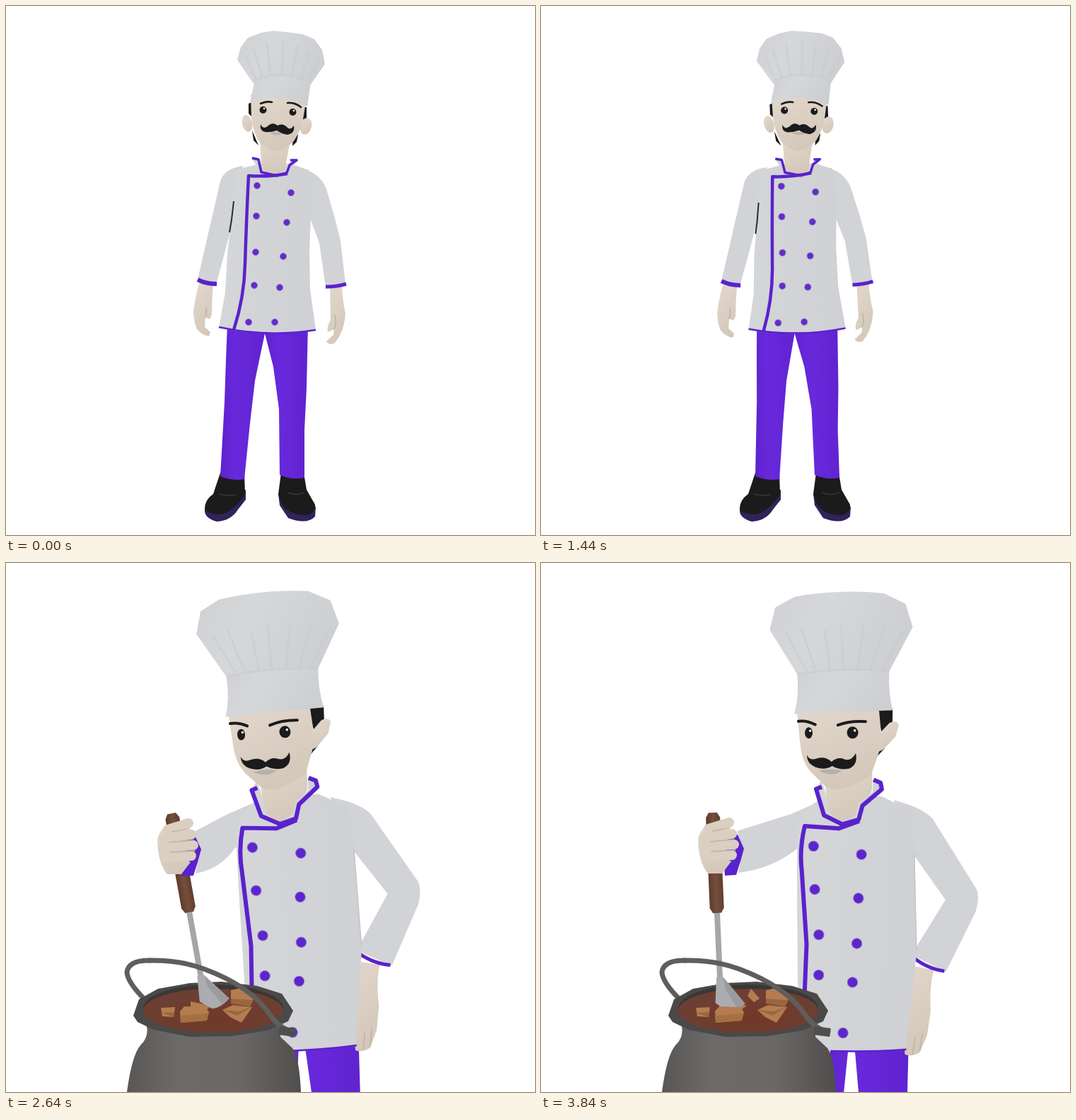
Animation, 748 px wide and 748 px high, one loop 3920 ms. Source, as an HTML page:

```html
<!DOCTYPE html>
<html lang="en">
<head>
<meta charset="utf-8">
<title>Chef</title>
<style>
html, body { margin: 0; width: 100%; height: 100%; overflow: hidden; background: #fff; }
svg { display: block; width: 100%; height: 100%; }
.trim { fill: none; stroke: #5a22cc; stroke-linejoin: round; }
.hair { fill: #1b1b1c; }
.brow { fill: none; stroke: #1b1b1c; stroke-linecap: round; }
.fold { fill: none; stroke: #c8cacd; stroke-width: 3; opacity: .5; }
.crease { fill: none; stroke: #bfb3a6; stroke-width: 1.6; stroke-linecap: round; }
.finger { fill: none; stroke: #dbcfc2; stroke-width: 14; stroke-linecap: round; }
.coat { fill: url(#coat); }
.arm { fill: #d1d3d6; }
.hat { fill: url(#hat); }
.skin { fill: url(#skin); }
.pants { fill: url(#pants); }
.iron { fill: none; stroke: #605e5c; }
</style>
</head>
<body>
<svg viewBox="0 0 748 748">
<defs>
  <linearGradient id="coat"><stop stop-color="#d4d6d8"/><stop offset=".5" stop-color="#d1d3d6"/><stop offset="1" stop-color="#cfd1d4"/></linearGradient>
  <linearGradient id="hat" y2=".3"><stop stop-color="#cfd0d3"/><stop offset=".4" stop-color="#d5d7d9"/><stop offset="1" stop-color="#cecfd2"/></linearGradient>
  <linearGradient id="skin" x2=".4" y2="1"><stop stop-color="#e3d8cc"/><stop offset="1" stop-color="#d4c8bb"/></linearGradient>
  <linearGradient id="pants"><stop stop-color="#5f22cc"/><stop offset=".35" stop-color="#6829dc"/><stop offset="1" stop-color="#6023d0"/></linearGradient>
  <linearGradient id="pot"><stop stop-color="#595756"/><stop offset=".3" stop-color="#6d6b69"/><stop offset=".65" stop-color="#6a6866"/><stop offset="1" stop-color="#504e4d"/></linearGradient>
  <linearGradient id="wood"><stop stop-color="#5d3b2b"/><stop offset=".5" stop-color="#754f3d"/><stop offset="1" stop-color="#603d2d"/></linearGradient>
  <radialGradient id="soup" cy=".65"><stop stop-color="#713826"/><stop offset="1" stop-color="#6d3f33"/></radialGradient>
</defs>

<g id="idle">
  <path fill="#30225a" d="M281 712Q280 724 298 729Q318 728 328 712L339 698V684L284 700Z"/>
  <path class="hair" d="M303 660H337L338 690Q325 712 305 719Q284 718 281 711Q281 698 293 690Z"/>
  <path fill="#30225a" d="M385 690L387 706L399 724Q425 734 437 722L438 708Z"/>
  <path class="hair" d="M389 660H421L425 684L437 705Q438 717 425 720Q400 720 390 704L385 690Z"/>
  <path d="M301 690Q314 694 325 691M398 688Q411 693 422 688" fill="none" stroke="#303033" stroke-width="2"/>
  <g id="legs" class="pants">
    <path d="M313 450L311 500L309 560L303 665Q320 672 337 669L345 590L352 530L366 463V450Z"/>
    <path d="M364 450L366 463L378 510L386 570L387 663Q405 671 422 667L422 600L425 540L427 450Z"/>
  </g>

  <g id="sway">
    <g id="armL">
      <path class="skin" d="M273 392Q266 418 265 434Q266 448 270 457Q278 466 287 467L289 461L281 454L282 440L288 443L291 436Q291 414 293 394Z"/>
      <path class="crease" d="M282 440Q284 432 283 427"/>
      <path class="arm" d="M335 226Q308 230 303 248L291 300L284 330L271 387L297 394L310 346L322 300Z"/>
      <path class="trim" stroke-width="6" d="M271 387Q283 393 298 393"/>
    </g>
    <g id="armR">
      <path class="skin" d="M458 398L475 397Q476 418 480 435Q478 462 464 477Q456 480 453 474L463 465L464 457L455 461Q453 454 459 444Z"/>
      <path class="crease" d="M464 457Q468 447 465 438"/>
      <path class="arm" d="M420 230Q447 238 454 262L465 300L473 332L480 393L452 397L443 335L430 300Z"/>
      <path class="trim" stroke-width="5" d="M452 397Q468 397 481 393"/>
    </g>
    <path class="coat" d="M356 224L325 231Q322 270 319 300L313 350L310 405L301 455Q370 470 438 458L430 400L429 345L431 300Q437 262 428 232L402 223Z"/>
    <path class="trim" stroke-width="2.5" d="M301 454Q370 469 438 458"/>
    <path d="M322 276L319 302L316 320" fill="none" stroke="#2b2a2c" stroke-width="2"/>
    <path class="skin" d="M359 185L361 230L376 239L394 233L402 190Z"/>
    <path class="coat" d="M348 216L356 214L364 234L384 240L361 238ZM411 218L402 221L394 235L384 240L399 236Z"/>
    <path class="trim" stroke-width="3.5" d="M348 215L357 217L361 235L383 240L397 236L401 225L411 218L402 218"/>
    <path class="trim" stroke-width="4.5" d="M398 237Q370 242 343 240Q340 300 338 365Q337 412 322 458"/>
    <g id="buttons1" fill="#632bc9" stroke="#8e78c8"></g>

    <path class="hair" d="M343 138L348 136V157L343 152ZM419 143L425 143V162L419 160ZM348 176L357 197L350 190ZM405 198L406 184L413 182L411 192Z"/>
    <ellipse class="skin" cx="341" cy="166" rx="7" ry="12" transform="rotate(-12 341 166)"/>
    <ellipse class="skin" cx="424" cy="170" rx="8" ry="12" transform="rotate(15 424 170)"/>
    <path class="skin" d="M346 125L347 158Q350 183 361 195Q372 205 382 205Q396 203 407 191Q417 176 420 160L425 130Z"/>
    <path class="brow" stroke-width="2.6" d="M360 138Q368 134 376 136M398 137Q408 136 417 143"/>
    <circle class="hair" cx="363.500" cy="147" r="5"/><circle class="hair" cx="405.500" cy="150" r="5"/>
    <g fill="#fff"><circle cx="365" cy="145" r="1.3"/><circle cx="407" cy="148" r="1.3"/></g>
    <path d="M372 179Q382 177 392 181Q382 185 372 179" fill="#b9b3ae"/>
    <path class="hair" d="M360 167Q363 175 370 170Q377 163 384 169Q391 165 397 171Q402 177 407 169Q409 180 398 182Q390 181 383 176Q374 179 366 178Q358 176 360 167Z"/>
    <path class="hat" d="M350 110L327 76L332 58L342 45L360 38L378 35L398 37L420 40L436 47L447 62L451 82L430 112Z"/>
    <path class="fold" d="M353 104L339 71M362 100L350 60M374 98L369 52M390 97L392 50M404 98L412 55M417 101L429 65M427 105L443 75"/>
    <path class="hat" d="M352 104Q390 90 431 108L426 142Q387 120 345 137Z"/>
    <path class="fold" d="M352 104Q390 90 431 108"/>
  </g>
</g>

<g id="cook">
  <path id="sleeve" class="arm"/>
  <g id="lean">
    <path class="pants" d="M400 685H425L420 750V765H390ZM434 685H510V765H443Z"/>
    <path class="skin" d="M510 566L543 572Q537 595 540 630L536 664L526 689Q515 696 505 692L503 656Q496 656 493 646L496 610Z"/>
    <path class="crease" d="M503 656L506 632M516 691L519 668M526 687L529 662"/>
    <path class="arm" d="M480 333Q520 342 536 358L600 455Q606 466 600 488L560 574L511 551L557 472L507 405Z"/>
    <path class="trim" stroke-width="5" d="M510 552Q532 570 558 573"/>
    <path class="coat" d="M380 333Q350 346 345 385L347 470L351 590L360 690H405Q460 690 506 686L518 550L512 405L505 348L463 328Z"/>
    <path d="M511 408L518 545" fill="none" stroke="#c4c5c9" stroke-width="1.500"/>
    <path class="trim" stroke-width="2.5" d="M400 690Q460 690 507 685"/>
    <g id="twist">
      <path class="skin" d="M384 300L388 350L408 366L432 354L451 320V280Z"/>
      <path class="coat" d="M379 308L372 319L384 358L410 370L392 355L384 320ZM452 304L464 308L465 318L439 342L434 363L410 370L428 355L433 338L452 322Z"/>
      <path class="trim" stroke-width="6" d="M380 317L372 320L384 357L410 369L433 362L438 342L465 318L463 309L453 305"/>
      <path class="trim" stroke-width="6" d="M434 364L405 375L357 373Q350 405 354 435L363 540L361 640"/>
      <g id="buttons2" fill="#5d25cb" stroke="#8a70cc"></g>

      <path class="hair" d="M455 207L478 204V225L463 238ZM460 258L468 260L457 272Z"/>
      <path class="skin" d="M462 237L474 224Q485 219 487 227L483 243L466 262L457 266Z"/>
      <path class="skin" d="M342 205L348 256Q351 284 367 299L386 317Q404 325 430 310L449 299L460 265L462 235L458 200Z"/>
      <path class="brow" stroke-width="4" d="M345 225Q356 223 369 229M401 229Q418 222 440 223"/>
      <ellipse class="hair" cx="360" cy="241" rx="5.500" ry="8"/><ellipse class="hair" cx="422" cy="239" rx="8" ry="8.500"/>
      <g fill="#eee"><circle cx="362" cy="238" r="1.800"/><circle cx="425" cy="236" r="1.800"/></g>
      <path fill="#b4b0ae" d="M375 294Q392 290 408 293Q394 304 375 294"/>
      <path class="hair" d="M358 272Q362 281 372 277Q384 273 393 281Q402 273 411 277Q421 280 427 268Q431 284 418 290Q405 293 394 287Q384 294 370 289Q358 284 358 272Z"/>
      <path class="hat" d="M343 160L302 97L309 65L336 49Q400 36 462 41L493 55L504 88L470 155Z"/>
      <path class="fold" d="M355 153L325 100M368 152L346 92M388 151L380 95M407 150L403 88M427 150L435 85M445 150L466 84M461 151L492 92"/>
      <path class="hat" d="M342 158Q405 147 472 151Q471 180 478 206Q410 210 339 215Q346 188 342 158Z"/>
      <path class="fold" d="M342 158Q405 147 472 151"/>
    </g>
  </g>

  <path fill="url(#pot)" d="M199 655Q202 671 190 682Q178 696 171 748H417Q415 700 405 686L388 670V655Z"/>
  <path class="iron" stroke-width="7" d="M197 618Q171 592 171 578Q174 561 205 562"/>
  <path fill="#4a4948" d="M180 640L188 617L215 602L260 594L305 592L355 598L390 609L406 633L399 648L370 661L320 669L260 670L209 660L186 649Z"/>
  <ellipse cx="293" cy="630" rx="99" ry="34" fill="#3a3736"/>
  <ellipse cx="293" cy="633" rx="99" ry="31" fill="url(#soup)"/>
  <g fill="#b57c50">
    <path d="M219 629L239 628L237 642L221 641ZM297 602L309 616L301 621L292 612ZM318 604L332 601L350 617L345 627L318 621ZM261 620L291 626L280 634L261 630ZM306 632L321 625L348 628L333 650L317 642Z"/>
    <path fill="#99673f" d="M318 616L349 618L345 627L318 623ZM306 632L329 634L347 628L327 640ZM219 636L238 635L237 642Z"/>
  </g>
  <g id="spoon">
    <path d="M0 130V233" stroke="#a5a6aa" stroke-width="8"/>
    <path fill="#abacaf" d="M-5 228H5L16 243L34 267Q20 278 8 277L-8 264Z"/>
    <path fill="#9a9b9f" d="M5 230L16 243L34 267L23 274L7 245Z"/>
    <path fill="url(#wood)" d="M-10 2L-6-5H6L10 2V130L6 137H-6L-10 130Z"/>
  </g>
  <path id="cuff" fill="#5a22cc" d="M-8-27L4-24L13-4L8 14L2 33L-14 34L-16 5Z"/>
  <g id="hand">
    <path class="skin" d="M-21 33Q-18 16-4 11L12 14L16 58L26 64L13 81L-7 81Q-20 66-21 33Z"/>
    <path class="finger" d="M-6 18L23 9M-12 30L27 25M-13 43L30 40M-10 57L27 55"/>
    <path class="crease" d="M24 17L0 21M30 33L-4 36M32 48L-2 50"/>
  </g>
  <path fill="#b57c50" d="M246 634L252 627L282 628L287 635L284 647L247 650Z"/>
  <path fill="#a5703f" d="M246 640L286 637L284 647L247 650Z"/>
  <path class="iron" stroke-width="7" stroke-linecap="round" d="M203 562Q245 561 280 574Q345 598 372 637Q386 658 406 663"/>
  <path d="M386 661L409 664" stroke="#504e4d" stroke-width="12"/>
</g>
</svg>
<script>
const $ = id => document.getElementById(id);
const LOOP = 3920, STEP = 80, CUT = 2000, CYCLE = 1920, TAU = 2 * Math.PI;

function addButtons(id, r, spots) {
  $(id).innerHTML = spots.map(([x, y]) => `<circle cx="${x}" cy="${y}" r="${r}"/>`).join('');
}
addButtons('buttons1', 4.6, [[355, 254], [403, 264], [354, 297], [397, 306], [353, 348],
  [392, 354], [351, 395], [387, 398], [343, 447], [380, 447]]);
addButtons('buttons2', 7.2, [[370, 401], [438, 411], [373, 462], [435, 473], [380, 526],
  [434, 537], [381, 583], [429, 592], [417, 664]]);

// Stirring keys: phase, spoon top x and y, tilt, cuff offset, hand scale
const stir = [
  [.125, 255, 357, 11.3, -13, 1.13],
  [.333, 235, 359, 10.2, 28, 1],
  [.417, 219, 362, 10, 30, 1],
  [.5, 195, 366, 9, 31, 1],
  [.625, 213, 366, 6.2, 30, 1],
  [.708, 229, 364, 4.5, 31, 1],
  [.958, 243, 358, 2.5, 31, 1],
];

// Periodic cubic through the keys
function sample(keys, p) {
  const n = keys.length;
  const key = i => {
    const k = keys[(i + n) % n];
    return [k[0] + Math.floor(i / n), ...k.slice(1)];
  };
  if (p < keys[0][0]) p++;
  let i = n - 1;
  while (keys[i][0] > p) i--;
  const [a, b, c, d] = [-1, 0, 1, 2].map(j => key(i + j));
  const h = c[0] - b[0], s = (p - b[0]) / h;
  return b.slice(1).map((v, j) => {
    j++;
    const m0 = (c[j] - a[j]) / (c[0] - a[0]) * h;
    const m1 = (d[j] - v) / (d[0] - b[0]) * h;
    const e = c[j] - v;
    return v + s * (m0 + s * (3 * e - 2 * m0 - m1 + s * (m0 + m1 - 2 * e)));
  });
}

const move = (id, value) => $(id).setAttribute('transform', value);
// Horizontal shear that leaves the line at height y in place
const shear = (k, y) => `matrix(1 0 ${k} 1 ${-k * y} 0)`;

function drawIdle(t) {
  const a = TAU * t / CYCLE, u = (1 - Math.cos(a)) / 2;
  move('legs', shear(.073 * u, 665));
  move('sway', `rotate(${-4.4 * u} 368 650)`);
  move('armL', `rotate(${1.3 * u + 1.6 * Math.sin(a) ** 2} 322 240)`);
  move('armR', `rotate(${1.3 * u} 430 245)`);
}

function drawCook(t) {
  const p = (t - CUT) / CYCLE;
  const wave = phase => Math.cos(TAU * (p - phase));
  const lean = wave(.88) - .03, turn = 1 - wave(.125);
  const [x, y, tilt, w, size] = sample(stir, p);
  const s = 21.7 * lean, wx = x + w;
  move('lean', `rotate(${1.7 * lean} 400 1065)`);
  move('twist', shear(.01 * turn, 690));
  move('spoon', `translate(${x} ${y}) rotate(${-tilt})`);
  move('hand', `translate(${x} ${y}) scale(${size} 1)`);
  move('cuff', `translate(${wx} ${y + 50})`);
  $('sleeve').setAttribute('d',
    `M${390 + s} 331L${335 + s} 355L${wx + 3} ${y + 21}L${wx + 11} ${y + 46}L${wx + 5} ${y + 80}` +
    `Q${(wx + 345 + s) / 2 + 10} ${y + 74} ${346 + s} 402L${390 + s} 400Z`);
}

function frame() {
  const t = Math.floor(performance.now() % LOOP / STEP) * STEP;
  const idle = t < CUT;
  $('idle').style.display = idle ? '' : 'none';
  $('cook').style.display = idle ? 'none' : '';
  (idle ? drawIdle : drawCook)(t);
  requestAnimationFrame(frame);
}
frame();
</script>
</body>
</html>
```
